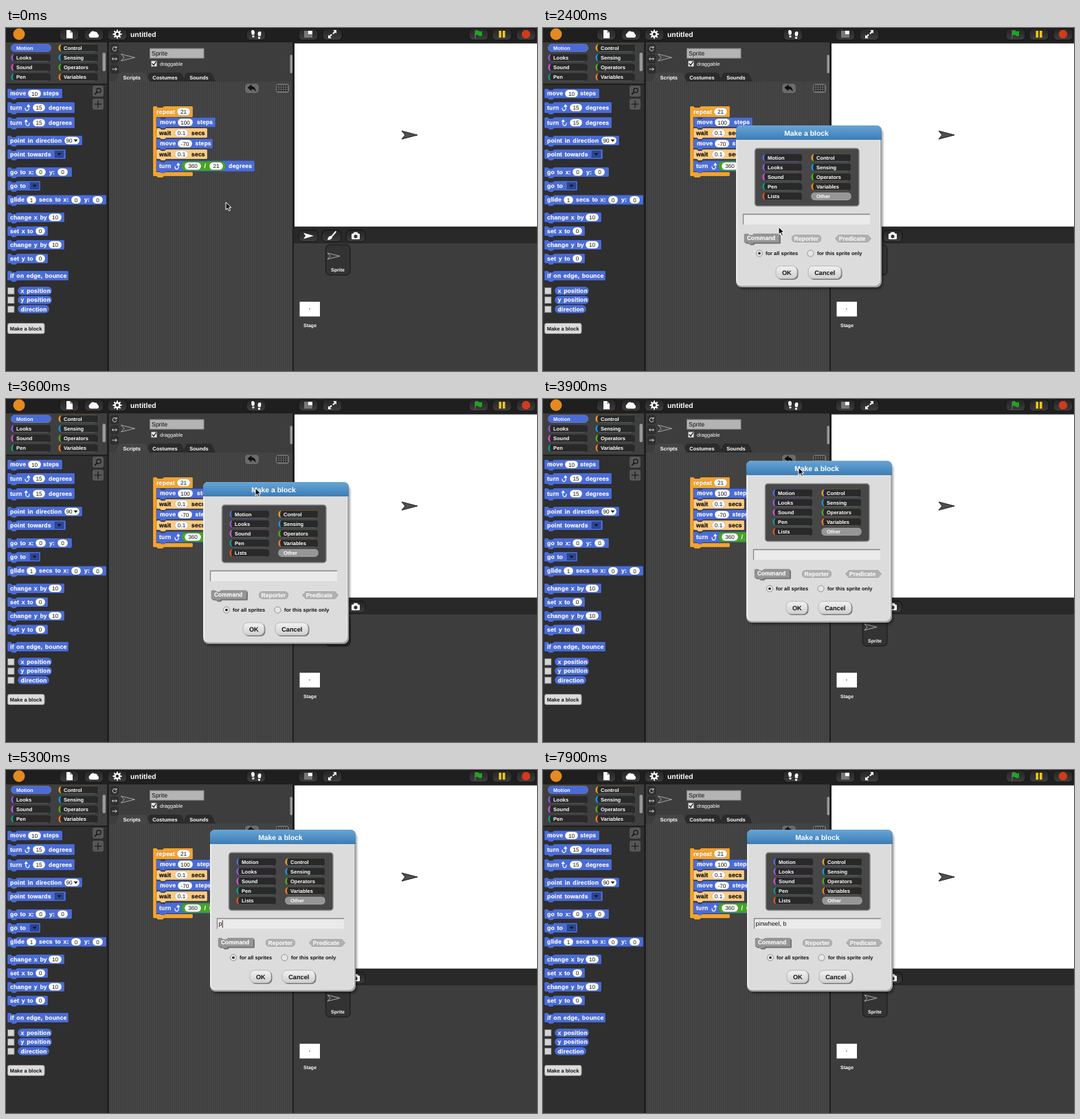
An HTML page for the animation above (8 s loop, 773x500 px).

```html
<!DOCTYPE html>
<html lang="en">
<head>
<meta charset="utf-8">
<title>Make a block</title>
<style>
html, body { margin: 0; width: 100%; height: 100%; overflow: hidden; background: #1f1f1f; }
svg { display: block; width: 773px; height: 500px; }
text { font-family: "Liberation Sans", Arial, sans-serif; white-space: pre; text-rendering: geometricPrecision; }
.b { font-weight: bold; }
.m { text-anchor: middle; }
.block { letter-spacing: .22px; word-spacing: 1.1px; }
</style>
</head>
<body>
<svg id="scene" viewBox="0 0 773 500" xmlns="http://www.w3.org/2000/svg"></svg>
<script>
const LOOP = 8000, STEP = 100;
const C = {
  Motion: '#4a6cd8', Looks: '#8f56e3', Sound: '#c653d4', Pen: '#0e9a80', Lists: '#d9541c',
  Control: '#e0a030', Sensing: '#1c93d8', Operators: '#55a820', Variables: '#ee7a24', Other: '#969696'
};
const ORANGE = '#f2a431', PALE = '#fbcb83';

// Drawing helpers; text is placed by its vertical centre.
const rect = (x, y, w, h, fill, r = 0, more = '') =>
  `<rect x="${x}" y="${y}" width="${w}" height="${h}" rx="${r}" fill="${fill}" ${more}/>`;
const path = (d, fill, more = '') => `<path d="${d}" fill="${fill}" ${more}/>`;
const line = (d, color, w = 1) => path(d, 'none', `stroke="${color}" stroke-width="${w}" stroke-linecap="round"`);
const circle = (x, y, r, fill, more = '') => `<circle cx="${x}" cy="${y}" r="${r}" fill="${fill}" ${more}/>`;
const text = (x, y, s, size, fill = '#fff', cls = 'b', more = '') =>
  `<text x="${x}" y="${y + size * .35}" font-size="${size}" fill="${fill}" class="${cls}" ${more}>${s}</text>`;
const at = (x, y, s, scale = '') => `<g transform="translate(${x} ${y}) ${scale}">${s}</g>`;
const edge = 'stroke="#000" stroke-opacity=".25" stroke-width=".6"';

function label(x, y, s, fill = '#fff', cls = 'b block') {
  const shade = fill === '#fff' ? text(x - .6, y - .6, s, 8.5, 'rgba(0,0,0,.25)', cls) : '';
  return shade + text(x, y, s, 8.5, fill, cls, `stroke="${fill}" stroke-width=".25"`);
}
const triangle = (x, y) => path(`M${x - 3} ${y - 1.5}h6l-3 3.5z`, '#111');

// A trailing "v" marks a drop-down slot.
function slot(x, right, y, value) {
  const w = right - x;
  if (value === 'v') return rect(x, y - 5, w, 10, '#2b4795', 0, edge) + triangle(x + w / 2, y);
  const drop = value.endsWith('v');
  return rect(x, y - 5.5, w, 11, '#fff', 5.5, edge) +
    text(x + w / 2 - (drop ? 4 : 0), y + .3, value.replace('v', ''), 8.2, '#111', 'm') +
    (drop ? triangle(right - 5.5, y) : '');
}
const parts = (list, y, fill) => list.map(p =>
  p.length === 2 ? label(p[0], y, p[1], fill) : slot(p[0], p[1], y, p[2])).join('');

const shape = (x, y, right, h) =>
  `M${x + 1} ${y}h4l2 2h5l2 -2H${right - 1}l1 1v${h - 2}l-1 1H${x + 14}l-2 2h-5l-2 -2h-4l-1 -1v${2 - h}z`;
const block = (x, mid, right, list, h = 14, color = C.Motion, fill) =>
  path(shape(x, mid - h / 2, right, h), color, edge) + parts(list, mid, fill);

const turnArrow = (x, y, flip = 1) => at(x, y,
  line('M-3 .5Q-3 5 .2 4.3Q3 3 2 -1', '#fff', 1.2) + path('M-1 -.8L1.4 -5L4.6 -1.6z', '#fff'), `scale(${flip} 1)`);

function category(name, x, y, chosen) {
  const left = x + 1.5, w = 58;
  if (chosen) return rect(left, y - 5.5, w, 11, C[name], 5, 'stroke="#fff" stroke-opacity=".25" stroke-width=".7"') +
    text(x + 9, y, name, 7.5);
  return rect(left, y - 5.5, w, 11, C[name], 5) +
    path(`M${left + 4} ${y - 5.5}h${w - 8}q4 0 4 5.5t-4 5.5h${8 - w}q-3 -5.5 0 -11z`, '#292929') +
    line(`M${left + 5} ${y + 5.4}h${w - 10}`, '#666', .7) + text(x + 9, y, name, 7.5);
}

const pill = (x, y, icon, w = 28) =>
  rect(x - w / 2, y - 8.5, w, 17, 'url(#pill)', 6, 'stroke="#111" stroke-width=".8"') + at(x, y, icon);

const undoArrow = path('M-6 -1L0 -6V-3Q6 -3 6 5Q4 1 0 1V4z', '#111');
const spriteShape = 'M0 0L23 6L0 12L5 6z';

function topBar() {
  let gear = circle(0, 0, 3.4, 'none', 'stroke="#fff" stroke-width="2.4"');
  for (let i = 0; i < 8; i++) gear += `<path d="M0 -4V-6.5" stroke="#fff" stroke-width="2" transform="rotate(${i * 45})"/>`;
  const foot = path('M-2 -5q3 0 3 4l-1 3h-3l-1 -4q0 -3 2 -3zM-2.5 3h3v2q-2 2 -3 0z', '#fff');
  return rect(0, 0, 773, 21, '#1f1f1f') + circle(19, 9, 8.5, '#e58a1f') +
    pill(92, 9, path('M-4 -6h5l4 4v8h-9z', '#fff') + path('M1 -6v4h4z', '#aaa')) +
    pill(128, 9, path('M-5 5a3.5 3.5 0 0 1 -.5 -6.5a4 4 0 0 1 6.5 -2a3.6 3.6 0 0 1 4.5 3a3 3 0 0 1 -.5 5.5z', '#fff')) +
    pill(162, 9, gear) + text(181, 9, 'untitled', 10.4) +
    pill(364, 9, at(-3, -1, foot) + at(3.5, 1, foot, 'scale(-1 1)')) +
    pill(440, 9, rect(-6, -5, 12, 10, '#777') + rect(0, -5, 6, 5, '#fff')) +
    pill(475, 9, path('M6 -6v5l-1.6 -1.6l-2.8 2.8l-1.4 -1.4l2.8 -2.8l-1.8 -2zM-6 6v-5l1.6 1.6l2.8 -2.8l1.4 1.4l-2.8 2.8l1.8 2z', '#fff')) +
    pill(688, 9, path('M-5 -5q2.5 -2 5 0t5 0v7q-2.5 2 -5 0t-5 0z', '#1fa51f') + line('M-5 -5V6', '#777')) +
    pill(722, 9, rect(-4.5, -5, 3.6, 10, '#f7c51c') + rect(1, -5, 3.6, 10, '#f7c51c')) +
    pill(757, 9, path('M-2.5 -6h5l3.5 3.5v5l-3.5 3.5h-5l-3.5 -3.5v-5z', '#d23a1a'));
}

function palette() {
  const names = [['Motion', 'Control'], ['Looks', 'Sensing'], ['Sound', 'Operators'], ['Pen', 'Variables']];
  let s = rect(0, 83, 147, 417, '#2f2f2f') + rect(0, 21, 147, 60, '#3f3f3f');
  names.forEach((row, i) => row.forEach((n, j) => s += category(n, 6 + j * 69, 29 + i * 14.2, n === 'Motion')));
  s += rect(140.5, 36, 4.5, 27, '#999', 2);
  s += rect(126, 84, 16, 16, '#575757', 3) + circle(135, 91, 3.2, 'none', 'stroke="#111" stroke-width="1.2"') +
    line('M132.6 93.4L129.5 96.5', '#111', 1.6) +
    rect(126, 103, 16, 16, '#575757', 3) + line('M134 106v10M129 111h10', '#111', 1.1);
  s += block(2, 95.5, 82, [[6, 'move'], [32, 51, '10'], [54, 'steps']]);
  [[116, 1], [138, -1]].forEach(([y, dir]) =>
    s += block(2, y, 100, [[6, 'turn'], [39, 57, '15'], [62, 'degrees']], 16) + turnArrow(31, y, dir));
  s += block(2, 164, 111, [[6, 'point in direction'], [85, 107, '90v']]) +
    block(2, 184, 87, [[6, 'point towards'], [71, 84, 'v']]) +
    block(2, 210, 96, [[6, 'go to x:'], [43, 58, '0'], [63, 'y:'], [75, 90, '0']]) +
    block(2, 230, 50, [[6, 'go to'], [35, 48, 'v']]) +
    block(2, 250.5, 146, [[6, 'glide'], [30, 44, '1'], [48, 'secs to x:'], [95, 109, '0'], [114, 'y:'], [126, 141, '0']]);
  ['x', 'y'].forEach((a, i) => {
    s += block(2, 276 + i * 40, 85, [[6, `change ${a} by`], [62, 81, '10']]) +
      block(2, 296 + i * 40, 61, [[6, `set ${a} to`], [43, 57, '0']]);
  });
  s += block(2, 361, 91, [[6, 'if on edge, bounce']]);
  [['x position', 67], ['y position', 67], ['direction', 63]].forEach(([n, right], i) => {
    const y = 383 + i * 13.4;
    s += rect(2.5, y - 4.5, 9.5, 9.5, '#d4d4d4', 0, 'stroke="#777" stroke-width=".8"') +
      rect(17, y - 6, right - 17, 12, C.Motion, 6, edge) + label(21.5, y, n);
  });
  return s + rect(2.5, 430.5, 53.5, 15, '#dcdcdc', 2.5, 'stroke="#999"') + text(29, 438, 'Make a block', 7.5, '#111', 'b m');
}

function spriteBar() {
  const tab = (x, w, fill) => path(`M${x} 78l5 -11q1 -2 4 -2h${w - 18}q3 0 4 2l5 11z`, fill);
  const small = 'stroke="#222" stroke-width=".6"';
  return rect(150, 21, 267, 57, '#3d3d3d') +
    [30, 45, 60].map(y => rect(152.5, y - 6, 11, 12, '#303030', 3, small)).join('') +
    line('M160.6 28.5A3 3 0 1 0 161 31.5M161 27v2h-2', '#ddd') +
    line('M154.8 45h6.4M156 43.6l-1.5 1.4l1.5 1.4M160 43.6l1.5 1.4l-1.5 1.4', '#ddd') +
    line('M155 60h6M159.5 58.4l1.8 1.6l-1.8 1.6', '#ddd') +
    at(167.5, 38, path('M0 0L20 5L0 10L4.5 5z', '#444', 'stroke="#bbb" stroke-width=".8"')) +
    rect(209.5, 30, 78.5, 14, '#b4b4b4', 0, 'stroke="#888"') + text(212, 37, 'Sprite', 8.9, '#111', '') +
    rect(211.5, 48, 8, 8, '#eee', 0, 'stroke="#888" stroke-width=".7"') + line('M213 52l2 2.2l3.5 -5', '#111', 1.2) +
    text(224, 52, 'draggable', 7.5, '#fff', '') + rect(413.5, 39, 3.5, 27, '#999', 1.7) +
    tab(203, 58, '#2b2b2b') + tab(257, 48, '#2b2b2b') + tab(159, 50, '#454545') +
    text(183.3, 72, 'Scripts', 7.5, '#fff', 'b m') + text(231.5, 72, 'Costumes', 7.5, '#fff', 'b m') +
    text(281, 72, 'Sounds', 7.5, '#fff', 'b m');
}

function scripts() {
  const dim = 'stroke="#333" stroke-width=".8"';
  let keys = '';
  for (let i = 0; i < 15; i++) keys += rect(394.5 + i % 5 * 3.3, 83.5 + (i / 5 | 0) * 3.2, 2, 2, '#111');
  const wait = y => block(219, y, 293, [[223, 'wait'], [246, 265, '0.1'], [270, 'secs']], 14, PALE, '#111');
  return rect(150, 78, 267, 422, 'url(#stripes)') +
    rect(347.5, 80.5, 21, 15, '#6a6a6a', 5, dim) + at(357.5, 88, undoArrow) +
    rect(392, 80.5, 21, 15, '#6a6a6a', 5, dim) + keys +
    path('M215 114h4l2 2h7l2 -2h41l1 1v14l-1 1H219V210h52l1 1v4l-1 1h-41l-2 2h-7l-2 -2h-4l-1 -1V115z', ORANGE, edge) +
    parts([[219, 'repeat'], [249, 268, '21']], 122) +
    block(219, 137.5, 305, [[224, 'move'], [250, 272, '100'], [278, 'steps']]) + wait(153) +
    block(219, 168.5, 301, [[224, 'move'], [250, 271, '-70'], [275.5, 'steps']]) + wait(184) +
    block(219, 201.3, 362, [[223, 'turn'], [324, 'degrees']], 16) + turnArrow(249, 201.3) +
    rect(255, 194.3, 65, 14, '#45a526', 7, edge) + parts([[260, 284, '360'], [288.5, '/'], [296, 316, '21']], 201.3);
}

function stage() {
  return rect(420, 22.5, 353, 267, '#fff') +
    at(576, 150, path(spriteShape, '#505050', 'stroke="#111" stroke-width=".9"')) +
    rect(419, 291, 354, 23, '#292929') + rect(419, 314, 354, 186, '#3d3d3d') +
    pill(440, 303, path('M-7 -4.5L8 0L-7 4.5L-4 0z', '#fff')) +
    pill(474, 303, line('M6 -6L0 1', '#fff', 2) + path('M-6 6q1 -6 5 -6l2 2q-1 4 -7 4z', '#fff')) +
    pill(509, 303, rect(-6, -3.5, 12, 8.5, '#fff', 1.5) + rect(-3, -5.5, 6, 3, '#fff', 1) + circle(0, .8, 2.6, '#333')) +
    rect(465.5, 316, 35.5, 44, '#333', 6, 'stroke="#202020" stroke-width="1.4"') +
    at(468, 328, path('M0 0L18 4.5L0 9L4 4.5z', '#383838', 'stroke="#ccc" stroke-width=".8"')) +
    text(483, 353, 'Sprite', 7, '#fff', 'b m') +
    rect(427.5, 399, 29.5, 21.5, '#fff') + rect(441, 409, 1.6, 1.2, '#555') + text(442.5, 434, 'Stage', 7, '#fff', 'b m');
}

const ROWS = [[257, 12], [271, 10], [281, 10], [291.5, 10.5], [304, 10.5]];
function menu() {
  const t = (x, y, s) => text(x, y, s, 8.9, '#111', '');
  return rect(324, 258, 72, 61, '#000', 3, 'opacity=".45" filter="url(#soft)"') +
    rect(321.5, 255.5, 71, 60.5, '#fff', 3, 'stroke="#444" stroke-width="1.4"') +
    `<rect id="row" x="322.5" width="69.5" fill="#b9b9b9"/>` +
    at(332, 263.5, undoArrow) + t(343, 263, 'undrop') + t(376, 263, '^Z') +
    line('M322 270h70M322 303.2h70', '#555', .9) +
    t(326, 276, 'clean up') + t(326, 286, 'add comment') + t(326, 297, 'scripts pic...') + t(326, 309.3, 'make a block...');
}

function dialog() {
  const names = [['Motion', 'Control'], ['Looks', 'Sensing'], ['Sound', 'Operators'], ['Pen', 'Variables'], ['Lists', 'Other']];
  const radio = (x, on) => circle(x, 186.5, 4.6, '#e6e6e6', 'stroke="#888" stroke-width=".9"') + (on ? circle(x, 186.5, 1.8, '#111') : '');
  const button = (x, w, s) => rect(x + 1.5, 206, w, 19, '#777', 7) +
    rect(x, 205, w, 18.5, 'url(#button)', 7, 'stroke="#aaa" stroke-width=".8"') + text(x + w / 2 + .3, 214.5, s, 9.2, '#111', 'b m');
  let s = rect(3, 4, 211, 235, '#000', 8, 'opacity=".35" filter="url(#soft)"') + rect(0, 0, 212, 236, '#a5a5a5', 8) +
    rect(0, 0, 210, 233.5, '#eee', 8) + rect(2, 10, 207, 222.5, '#dcdcdc', 6) +
    path('M0 21V8Q0 0 8 0H204Q212 0 212 8V21z', 'url(#title)') +
    text(102.5, 11, 'Make a block', 10.4, '#fff', 'b m') +
    rect(27.5, 33.5, 151.5, 84, '#474747', 4, 'stroke="#888" stroke-width="1.5"');
  names.forEach((row, i) => row.forEach((n, j) => s += category(n, 37 + j * 71, 47 + i * 14.1, n === 'Other')));
  return s + rect(10.5, 129.5, 184.5, 15, '#ebebeb') + line('M10.5 144V129.5H194.5', '#858585', 1.3) +
    `<text id="typed" x="12.5" y="140.3" font-size="8.9" fill="#111"></text>` +
    `<rect id="caret" y="132" width="1" height="11" fill="#333"/>` +
    path(shape(14, 159.5, 65, 13), '#777') + path(shape(12, 158, 63.5, 13), '#969696', edge) +
    label(36.5, 164.5, 'Command', '#fff', 'b m') +
    rect(80, 158.5, 45, 13, '#b0b0b0', 6.5, 'stroke="#eee" stroke-width=".8"') + label(102.3, 165, 'Reporter', '#f4f4f4', 'b m') +
    path('M143 165l6 -6.5h43l6 6.5l-6 6.5h-43z', '#b0b0b0', 'stroke="#eee" stroke-width=".8"') + label(169, 165, 'Predicate', '#f4f4f4', 'b m') +
    radio(34, true) + radio(108.5) + text(43, 186.5, 'for all sprites', 7.5, '#111') + text(118, 186.5, 'for this sprite only', 7.5, '#111') +
    button(58, 31, 'OK') + button(105, 48, 'Cancel');
}

const fade = (id, a, b) =>
  `<linearGradient id="${id}" x2="0" y2="1"><stop stop-color="${a}"/><stop offset="1" stop-color="${b}"/></linearGradient>`;

const scene = document.getElementById('scene');
scene.innerHTML = '<defs>' + fade('pill', '#242424', '#3d3d3d') + fade('title', '#68a5d6', '#3c7db5') + fade('button', '#f2f2f2', '#cfcfcf') +
  '<filter id="soft"><feGaussianBlur stdDeviation="1.4"/></filter>' +
  `<pattern id="stripes" width="3" height="3" patternUnits="userSpaceOnUse">${rect(0, 0, 3, 3, '#404040')}${rect(0, 0, 1, 3, '#494949')}</pattern></defs>` +
  rect(0, 0, 773, 500, '#1f1f1f') + topBar() + palette() + spriteBar() + scripts() + stage() +
  `<g id="menu">${menu()}</g><g id="dialog">${dialog()}</g>` +
  `<g id="cursor">${path('M0 0V11L2.6 8.6L4.4 12.6L6.4 11.7L4.6 7.8H8z', '#111', 'stroke="#fff" stroke-width="1"')}</g>`;
const [menuEl, dialogEl, cursorEl, rowEl, typedEl, caretEl] =
  ['menu', 'dialog', 'cursor', 'row', 'typed', 'caret'].map(id => document.getElementById(id));

// Timeline: [ms, x, y]
const CURSOR = [[900, 320, 254], [1100, 323, 264], [1500, 341, 310], [2300, 341, 310], [3100, 357, 150], [3400, 357, 150],
  [3900, 372, 100], [4050, 373, 96], [4300, 373, 96], [4700, 345, 223]];
const DIALOG = [[3400, 281, 142], [3900, 296, 90], [4050, 297, 87]];
const WORD = 'pinwheel, b';
const KEYS = [5200, 5500, 5800, 6000, 6300, 6600, 6900, 7100, 7400, 7600, 7800];

function place(track, t) {
  const i = track.findIndex(k => k[0] > t);
  if (i === 0) return track[0].slice(1);
  if (i < 0) return track[track.length - 1].slice(1);
  const [a, b] = [track[i - 1], track[i]];
  const p = (t - a[0]) / (b[0] - a[0]);
  return [1, 2].map(n => Math.round(a[n] + (b[n] - a[n]) * p));
}
const show = (el, on) => el.setAttribute('visibility', on ? 'visible' : 'hidden');

function draw(t) {
  const [cx, cy] = place(CURSOR, t);
  cursorEl.setAttribute('transform', `translate(${cx} ${cy})`);
  show(cursorEl, t < KEYS[0]);

  const menuOn = t >= 800 && t < 2100;
  const row = ROWS.find(([y, h]) => cx > 321 && cy >= y && cy < y + h);
  show(menuEl, menuOn);
  show(rowEl, menuOn && row);
  if (row) {
    rowEl.setAttribute('y', row[0]);
    rowEl.setAttribute('height', row[1]);
  }

  dialogEl.setAttribute('transform', `translate(${place(DIALOG, t).join(' ')})`);
  show(dialogEl, t >= 2200);
  typedEl.textContent = WORD.slice(0, KEYS.filter(k => k <= t).length);
  const blink = t % 1000;
  show(caretEl, t >= 4800 && blink >= 250 && blink < 750);
  caretEl.setAttribute('x', 12.8 + typedEl.getComputedTextLength());
}

const start = performance.now();
function tick() {
  const t = (performance.now() - start) % LOOP;
  draw(Math.floor(t / STEP) * STEP);
  requestAnimationFrame(tick);
}
tick();
</script>
</body>
</html>
```
